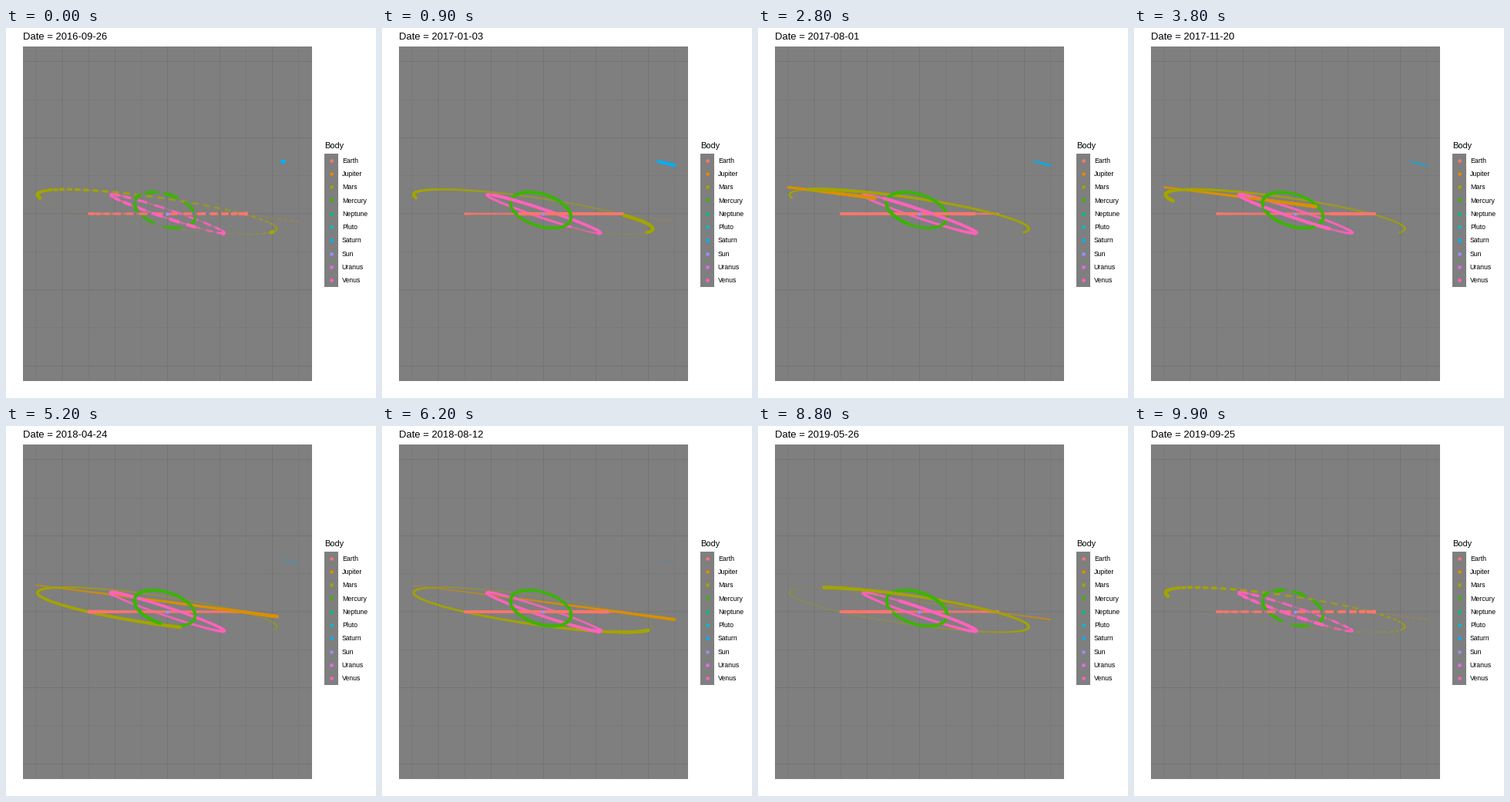
A matplotlib script that plays this animation: 480x480 px, repeating every 10000 ms.

```python
import matplotlib.pyplot as plt
import numpy as np
from matplotlib.animation import FuncAnimation
from matplotlib.patches import Rectangle

SIZE, FRAMES, SPAN = 480, 100, 1094
START = np.datetime64("2016-09-26")
LEFT, RIGHT, TOP, BOTTOM = 21.9, 396.9, 24, 458
CX, CY = (LEFT + RIGHT) / 2, (TOP + BOTTOM) / 2
AU = 1.496                      # in units of 1e8 km
SX = (RIGHT - LEFT) / 5.5       # px per 1e8 km across
SY = (BOTTOM - TOP) / 1.1       # px per 1e8 km up
EPOCH = 6843                    # days since J2000 at the first day

COLORS = {
    "Earth": "#F8766D", "Jupiter": "#D89000", "Mars": "#A3A500",
    "Mercury": "#39B600", "Neptune": "#00BF7D", "Pluto": "#00BFC4",
    "Saturn": "#00B0F6", "Sun": "#9590FF", "Uranus": "#E76BF3",
    "Venus": "#FF62BC",
}

# a (AU), e, inclination, mean longitude, deg per day, perihelion, node
ORBITS = {
    "Venus": (0.7233, 0.0068, 3.395, 181.98, 1.6021303, 131.60, 76.68),
    "Earth": (1.0, 0.0167, 0, 100.46, 0.9856091, 102.94, 0),
    "Mars": (1.5237, 0.0934, 1.850, -4.55, 0.5240329, -23.94, 49.56),
    "Jupiter": (5.2029, 0.0484, 1.304, 34.40, 0.0830868, 14.73, 100.47),
    "Saturn": (9.5367, 0.0539, 2.486, 49.94, 0.0334700, 92.60, 113.66),
}

days = np.arange(SPAN + 1)
step = np.rint(days * (FRAMES - 1) / SPAN).astype(int)
counts = np.bincount(step)
rank = days - np.searchsorted(step, step)


def eccentric(mean, e):
    E = mean.copy()
    for _ in range(12):
        E = mean + e * np.sin(E)
    return E


def orbit(a, e, inc, lon, rate, peri, node):
    """Side view of an orbit in stage pixels, one point per day."""
    inc, peri, node = np.radians([inc, peri, node])
    E = eccentric(np.radians(lon + rate * (EPOCH + days)) - peri, e)
    u = np.cos(E) - e
    v = np.sqrt(1 - e * e) * np.sin(E)
    r = a * np.hypot(u, v) * AU
    arg = np.arctan2(v, u) + peri - node
    x = r * (np.cos(node) * np.cos(arg) - np.sin(node) * np.sin(arg) * np.cos(inc))
    z = r * np.sin(arg) * np.sin(inc)
    keep = np.abs(x) <= 2.5
    return np.where(keep, CX + SX * x, np.nan), CY - SY * z


def mercury():
    mean = np.radians(252.25 + 4.0923345 * (EPOCH + days) - 77.46)
    th = eccentric(mean, 0.2056) - np.radians(41)
    return 206 + 39.3 * np.cos(th), 236.2 - 23.3 * np.sin(th - np.radians(23))


tracks = {"Mercury": mercury()}
tracks.update((name, orbit(*el)) for name, el in ORBITS.items())
xy = np.hstack([np.array(t) for t in tracks.values()]).T
rgb = np.vstack([np.tile(plt.matplotlib.colors.to_rgb(COLORS[n]), (days.size, 1))
                 for n in tracks])
p_step, p_rank = np.tile(step, len(tracks)), np.tile(rank, len(tracks))
ok = ~np.isnan(xy[:, 0])
xy, rgb, p_step, p_rank = xy[ok], rgb[ok], p_step[ok], p_rank[ok]


def diameter(s):
    return 1.42 + 3.2 * s


plt.rcParams["font.family"] = "Liberation Sans"
fig = plt.figure(figsize=(20 / 3, 20 / 3), dpi=72, facecolor="white")
ax = fig.add_axes([0, 0, 1, 1])
ax.set(xlim=(0, SIZE), ylim=(SIZE, 0))
ax.axis("off")

ax.add_patch(Rectangle((LEFT, TOP), RIGHT - LEFT, BOTTOM - TOP, fc="#7F7F7F", lw=0))
grid = dict(color="#6B6B6B", solid_capstyle="butt", snap=False, zorder=1.5)
for k in range(-5, 6):
    x = CX + k * SX / 2
    ax.plot([x, x], [TOP, BOTTOM], lw=0.27 if k % 2 else 0.53, **grid)
for k in range(-4, 5):
    y = CY + k * SY / 8
    ax.plot([LEFT, RIGHT], [y, y], lw=0.27 if k % 2 else 0.53, **grid)

title = ax.text(22, 15, "", fontsize=13, va="baseline")
ax.text(413, 156, "Body", fontsize=11, va="baseline")
ax.add_patch(Rectangle((413.2, 163), 17.4, 172.8, fc="#7F7F7F", lw=0))
for k, (name, color) in enumerate(COLORS.items()):
    y = 171.6 + 17.28 * k
    ax.scatter([421.9], [y], s=diameter(1) ** 2, c=color, lw=0, zorder=3)
    ax.text(435.8, y + 3.2, name, fontsize=8.8, va="baseline")

wake = ax.scatter([], [], marker=(12, 0, 0), lw=0, zorder=2)
ax.scatter([CX], [CY], s=diameter(1) ** 2, c=COLORS["Sun"], lw=0, zorder=3)


def draw(i):
    age = (i - p_step) % FRAMES
    fade = (1 - age / FRAMES) ** 3
    # a day is drawn only if the current step holds a row of the same rank
    show = np.flatnonzero((p_rank < counts[i]) & (fade > 0.003))
    show = show[np.argsort(-age[show], kind="stable")]
    s = fade[show]
    wake.set_offsets(xy[show])
    wake.set_sizes(diameter(s) ** 2)
    wake.set_facecolors(np.column_stack([rgb[show], 1 - (1 - s) ** 1.25]))
    date = START + int(round(i * SPAN / (FRAMES - 1)))
    title.set_text(f"Date = {date}")
    return wake, title


anim = FuncAnimation(fig, draw, frames=FRAMES, interval=100, repeat=True,
                     repeat_delay=0, blit=False)
plt.show()
```
